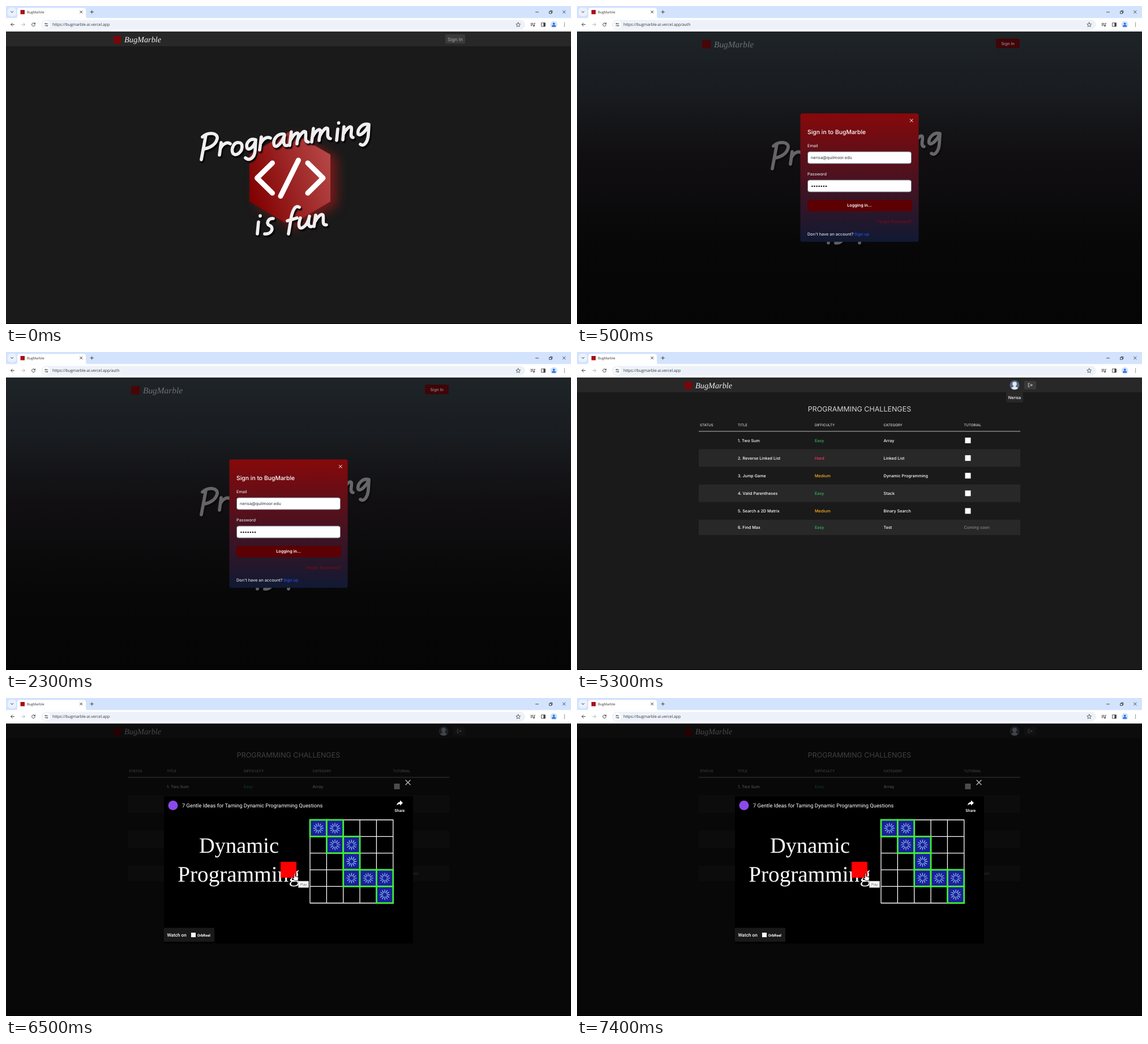
Animation of 998 by 561 pixels, one loop 8000 ms. Source, as an HTML page:

```html
<!DOCTYPE html>
<html lang="en">
<head>
<meta charset="utf-8">
<title>BugMarble</title>
<style>
  html, body { margin: 0; width: 100%; height: 100%; overflow: hidden; background: #1a1a1a; }
  svg { display: block; width: 998px; height: 561px; text-rendering: geometricPrecision; }
  text { white-space: pre; }
  .line { fill: none; stroke-linecap: round; stroke-linejoin: round; }
  .hexagon { filter: drop-shadow(12px 6px 9px rgba(200, 25, 25, .5)); }
  .lettering { filter: drop-shadow(2.5px 3px 1px #000); }
</style>
</head>
<body>
<svg id="stage" viewBox="0 0 998 561">
  <defs>
    <linearGradient id="hexFill" x1="0" y1=".7" x2="1" y2=".3">
      <stop stop-color="#800000"/><stop offset="1" stop-color="#b64646"/>
    </linearGradient>
    <linearGradient id="night" x2="0" y2="1">
      <stop stop-color="#1e2427"/><stop offset=".2" stop-color="#191c20"/>
      <stop offset=".42" stop-color="#110f12"/><stop offset=".75" stop-color="#070707"/>
      <stop offset="1" stop-color="#050505"/>
    </linearGradient>
    <linearGradient id="card" x2="0" y2="1">
      <stop stop-color="#86090b"/><stop offset="1" stop-color="#101a33"/>
    </linearGradient>
  </defs>
</svg>
<script>
const BRAND = 'BugMarble', LOOP = 8000;
const INTER = 'Inter, sans-serif', UI = 'Open Sans, sans-serif',
      ROBOTO = 'Roboto, sans-serif', SERIF = 'Liberation Serif, serif';

const rect = (x, y, w, h, fill, r = 0, more = '') =>
  `<rect x="${x}" y="${y}" width="${w}" height="${h}" rx="${r}" fill="${fill}" ${more}/>`;
const circle = (x, y, r, fill) => `<circle cx="${x}" cy="${y}" r="${r}" fill="${fill}"/>`;
const line = (d, color, w = 1) => `<path class="line" d="${d}" stroke="${color}" stroke-width="${w}"/>`;
const shape = (d, fill) => `<path d="${d}" fill="${fill}"/>`;
const text = (x, y, str, size, fill, { font = INTER, weight = 400, anchor = 'start', more = '' } = {}) =>
  `<text x="${x}" y="${y}" font-family="${font}" font-size="${size}" font-weight="${weight}"
    text-anchor="${anchor}" fill="${fill}" ${more}>${str}</text>`;
const group = (id, body) => `<g id="${id}">${body}</g>`;
const cross = (x, y, r, color, w) =>
  line(`M${x - r} ${y - r}l${2 * r} ${2 * r}m0 ${-2 * r}l${-2 * r} ${2 * r}`, color, w);
const page = (fill, more) => rect(0, 45, 998, 516, fill, 0, more);
const medium = { weight: 500 };

function browser() {
  const ink = '#3c4043';
  return rect(0, 0, 998, 45, '#fff') + rect(0, 0, 998, 21.3, '#d3e3fd')
    + rect(3, 3, 15, 15, '#eaf1fe', 5) + line('M8.7 9.6l1.9 1.9l1.9-1.9', '#1f1f1f', 1)
    + shape('M16 21.4q4 0 4-4v-10q0-4 4-4h113q4 0 4 4v10q0 4 4 4z', '#fff')
    + rect(25.5, 7, 7.5, 7.5, '#a8101a')
    + text(37, 13, BRAND, 6, '#333', { font: UI })
    + cross(132.7, 10.5, 1.9, '#222', 1)
    + line('M149 10.5h5.4m-2.7-2.7v5.4', '#333', .9)
    + line('M935.5 10.8h5', '#222', .8)
    + line('M960 9.7h3.6v3.6h-3.6zM961.2 9.5v-1.2h3.6v3.7h-1', '#222', .8)
    + cross(985.8, 10.5, 2.3, '#222', .8)
    + line('M14.5 32.7h-5.8m2.6-2.7l-2.7 2.7l2.7 2.7', ink, 1)
    + line('M27.5 32.7h5.8m-2.6-2.7l2.7 2.7l-2.7 2.7', '#b4b7bb', 1)
    + line('M51 31.2a2.9 2.9 0 1 0 .4 2.2M51.4 29.7v2h-2', ink, 1)
    + rect(62, 24.5, 855, 17, '#edf2fa', 8.5) + circle(71.3, 33, 6.7, '#fff')
    + line('M68.5 31.2h.6m2.6 0h2.3M68.5 34.8h2.3m2.7 0h.5', ink, .9)
    + line('M71.3 31.2a1 1 0 1 0-2 0a1 1 0 1 0 2 0M73.5 34.8a1 1 0 1 0-2 0a1 1 0 1 0 2 0', ink, .8)
    + line('M904.7 29l1.1 2.6l2.8.3l-2.1 1.9l.6 2.7l-2.4-1.5l-2.4 1.5l.6-2.7l-2.1-1.9l2.8-.3z', ink, .8)
    + line('M927 30.6h4.4m-4.4 2h4.4m-4.4 2h2.5M933.3 35v-4.6h1.3', ink, .9) + circle(932.3, 35, 1.2, ink)
    + line('M946 29.8h6.4v6.2h-6.4z', ink, .9) + rect(949.4, 29.8, 3, 6.2, ink)
    + circle(967.7, 32.8, 6, '#cfe1ff') + circle(967.7, 31.2, 1.8, '#1a67d8')
    + shape('M963.9 36.6q0-3 3.8-3t3.8 3z', '#1a67d8')
    + [30, 32.8, 35.6].map(y => circle(986.5, y, .75, ink)).join('');
}

const wordmark = (x, y, size, color) =>
  text(x, y, BRAND, size, color, { font: SERIF, more: 'font-style="italic"' });

const topBar = () => rect(0, 45, 998, 26, '#282828')
  + rect(190, 53, 13, 13, '#7d0509') + wordmark(209, 64, 14.3, '#f2f2f2');

function hero() {
  const m = 'm0 0l-3 24m2-10c5-10 11-14 13-11c2 5-2 11-2 18m1-7c5-10 11-17 14-14c2 6-3 17 5 18';
  const strokes = [
    'M353 228L345 271M347 231C358 221 375 224 373 234C371 244 361 250 351 252',
    'M380 241L377 263M379 251C383 243 391 239 396 243',
    'M411 241C402 240 397 253 401 260C406 266 417 258 417 248C417 243 414 241 411 241',
    'M441 236C430 232 423 243 426 251C430 256 439 247 441 237L440 255C439 268 430 274 423 268',
    'M451 231L448 254M450 242C454 234 461 230 467 233',
    'M491 226C480 224 470 236 474 246C478 252 488 240 492 228C490 238 489 248 497 246',
    'M504 222' + m, 'M543 216' + m,
    'M586 217L584 237M587.6 206v.5',
    'M597 213L595 236M596 226C601 217 607 211 610 214C612 219 606 231 613 232',
    'M641 209C630 206 620 217 622 226C626 231 636 220 641 210L640 227C639 240 632 249 626 244',
    'M446 381L444 402M449 370v.5',
    'M472 375C463 374 459 384 465 387C474 390 470 403 457 402',
    'M518 355C511 350 505 362 503 378L499 402M497 379L514 374',
    'M520 374C515 388 518 394 524 391C530 388 534 380 536 371C533 383 534 391 540 389',
    'M547 369L544 389M546 380C551 371 558 365 560 369C562 376 557 387 566 386'
  ];
  return `<g class="hexagon">${shape('M501.5 221L573 262V345L501.5 387L430 345V262z', 'url(#hexFill)')}</g>`
    + line('M470.5 277L443.5 303.5L470.5 330M516.5 272L485 335.5M533 277L560 303.5L533 330', '#fff', 9)
    + `<g class="lettering" role="img" aria-label="Programming is fun">${line(strokes.join(''), '#f0eeee', 5.7)}</g>`;
}

const landing = () => page('#1a1a1a') + topBar() + hero()
  + rect(776, 50, 35, 16.5, '#3a3a3a', 2)
  + text(793.5, 61.6, 'Sign In', 8.4, '#a9a9a9', { anchor: 'middle' });

function login() {
  const field = y => rect(407.5, y, 183, 21, '#fff', 3.5, 'stroke="#6b7280"');
  const pale = '#d9dbe0', size = 7.28;
  const dots = Array.from({ length: 7 }, (_, i) => circle(415.4 + i * 4.1, 318, 1.3, '#111')).join('');
  return page('url(#night)')
    + `<g transform="translate(0 16)" opacity=".38">${hero()}</g>`
    + rect(221, 60, 15, 15, '#480508') + wordmark(242, 72.5, 15.4, '#707272')
    + rect(740, 57.5, 42, 17, '#3f0508', 3)
    + text(761, 68.6, 'Sign In', size, '#948d8e', { weight: 500, anchor: 'middle' })
    + rect(394.5, 189.6, 209, 226.4, 'url(#card)', 4)
    + cross(590.8, 202, 2.5, '#fff', 1)
    + text(407, 225.5, 'Sign in to ' + BRAND, 10.4, '#fff', medium)
    + text(407, 249.2, 'Email', size, pale, medium) + field(257)
    + text(413, 270.3, 'nerisa@quilmoor.edu', size, '#30343b')
    + text(407, 299.2, 'Password', size, pale, medium) + field(307) + dots
    + rect(407, 342, 185, 20, '#5c0003', 3)
    + text(499, 354.3, 'Logging in...', size, '#fff', { weight: 600, anchor: 'middle' })
    + text(591.5, 382.6, 'Forgot Password?', size, '#8b0a12', { anchor: 'end' })
    + text(407, 405.3, "Don't have an account?", size, pale, medium)
    + text(490, 405.3, 'Sign up', size, '#2152ea', medium);
}

function challenges() {
  const columns = [217, 284, 420, 541.5, 683.5];
  const levels = { Easy: '#2cbb5d', Medium: '#ffb11e', Hard: '#ff375f' };
  const rows = [
    ['Two Sum', 'Easy', 'Array'], ['Reverse Linked List', 'Hard', 'Linked List'],
    ['Jump Game', 'Medium', 'Dynamic Programming'], ['Valid Parentheses', 'Easy', 'Stack'],
    ['Search a 2D Matrix', 'Medium', 'Binary Search'], ['Find Max', 'Easy', 'Test']
  ];
  const cell = (col, y, str, color) => text(columns[col], y + 2.5, str, 7.22, color, medium);
  const body = rows.map(([title, level, category], i) => {
    const last = i === 5, y = last ? 309.6 : 156 + i * 31.1;
    return (i % 2 ? rect(215, 171.5 + (i - 1) * 31.1, 568, last ? 27 : 31, '#282828') : '')
      + cell(1, y, `${i + 1}. ${title}`, '#fff') + cell(2, y, level, levels[level])
      + cell(3, y, category, '#fff')
      + (last ? text(683.5, y + 2.5, 'Coming soon', 7.28, '#8f949c') : rect(685.5, y - 5, 10, 10, '#fff'));
  }).join('');
  return page('#1a1a1a') + topBar()
    + circle(773, 58.4, 8.5, '#52688a') + circle(773, 56.2, 3.8, '#e6e6e6')
    + shape('M771 58h4v3.2q3 .6 4 2.6a8.4 8.4 0 0 1-12 0q1-2 4-2.6z', '#e6e6e6')
    + rect(790, 51, 21, 15, '#3a3a3a', 2)
    + line('M799.3 55.2h-2v6.4h2M799.7 58.4h4.2m-1.7-1.9l1.9 1.9l-1.9 1.9', '#ddd', .9)
    + text(499, 104.5, 'PROGRAMMING CHALLENGES', 12.48, '#d4d6d9', { anchor: 'middle' })
    + ['STATUS', 'TITLE', 'DIFFICULTY', 'CATEGORY', 'TUTORIAL']
        .map((name, i) => text(columns[i], 131.3, name, 6.15, '#d4d6d9', medium)).join('')
    + rect(215, 139.5, 568, .9, '#c8cacd') + body;
}

const nameTip = () => rect(758, 70.5, 30, 18.5, '#282828', 2)
  + text(773, 82.6, 'Nerisa', 7.28, '#fff', { weight: 500, anchor: 'middle' });

function video() {
  const X = 537, Y = 215, STEP = 29.35;
  const path = ['00', '01', '11', '12', '22', '32', '33', '34', '44'];
  const rays = Array.from({ length: 12 }, (_, i) => {
    const c = Math.cos(i * Math.PI / 6), s = Math.sin(i * Math.PI / 6);
    return `M${4 * c} ${4 * s}L${8.6 * c} ${8.6 * s}`;
  }).join('');
  const grid = Array.from({ length: 6 }, (_, i) =>
    `M${X} ${Y + i * STEP}h${5 * STEP}M${X + i * STEP} ${Y}v${5 * STEP}`).join('');
  const cells = path.map(([row, col]) => {
    const x = X + col * STEP, y = Y + row * STEP;
    return rect(x, y, STEP, STEP, '#1d1f9c', 0, 'stroke="#3ff02f" stroke-width="2.8"')
      + `<g transform="translate(${x + STEP / 2} ${y + STEP / 2})">${line(rays, '#8fd0ee', 1.2)}</g>`;
  }).join('');
  const hand = 'M508.6 309.5q1.5-1 2 .6v4.4l4.6 1.2q1.4.5 1.2 2l-.8 4.8h-5.4l-4.2-4.6q.8-1.3 2.6-.2z';
  return page('#000', 'opacity=".7"')
    + cross(710, 149, 4, '#b4b4b4', 1.5)
    + rect(279, 173.3, 440, 259.7, '#000')
    + circle(295, 189.5, 8.5, '#8b4ae8')
    + text(311, 192.6, '7 Gentle Ideas for Taming Dynamic Programming Questions', 9.36, '#fff', { font: ROBOTO })
    + shape('M696 180.5l5 4.6l-5 4.6v-2.8q-4 0-6 2.8q.6-5.6 6-6.5z', '#fff')
    + text(695.3, 201.2, 'Share', 7, '#fff', { font: ROBOTO, weight: 500, anchor: 'middle' })
    + text(411.5, 272.6, 'Dynamic', 38.5, '#fff', { font: SERIF, anchor: 'middle' })
    + text(411, 323.5, 'Programming', 39.2, '#fff', { font: SERIF, anchor: 'middle' })
    + line(grid, '#fff', 1.3) + cells
    + rect(485, 289, 28, 28, '#f00')
    + rect(279, 405.5, 89, 24.5, '#191919')
    + text(284.5, 420.8, 'Watch on', 8.2, '#fff', { font: ROBOTO, weight: 500 })
    + rect(327, 414, 8, 8, '#fff')
    + text(338, 420.8, 'OrbReel', 6.4, '#fff', { font: ROBOTO, weight: 700 })
    + `<path d="${hand}" fill="#fff" stroke="#000" stroke-width=".8"/>`
    + rect(516.3, 323, 18.5, 11.5, '#fff', 0, 'stroke="#777" stroke-width=".6"')
    + text(525.5, 331, 'Play', 6, '#555', { font: UI, anchor: 'middle' });
}

const stage = document.getElementById('stage');
stage.innerHTML += browser()
  + text(82, 35.3, '', 6.9, '#333', { font: UI, more: 'id="url"' })
  + group('landing', landing()) + group('login', login()) + group('challenges', challenges())
  + group('nameTip', nameTip()) + group('video', video())
  + rect(0, 560, 998, 1, '#000');

const scenes = [
  { until: 500, show: ['landing'], path: '' },
  { until: 3500, show: ['login'], path: '/auth' },
  { until: 6500, show: ['challenges', 'nameTip'], path: '' },
  { until: LOOP, show: ['challenges', 'video'], path: '' }
];
const layers = ['landing', 'login', 'challenges', 'nameTip', 'video'].map(id => document.getElementById(id));
const url = document.getElementById('url');
const start = performance.now();
let current;

function draw() {
  const time = (performance.now() - start) % LOOP;
  const scene = scenes.find(s => time < s.until);
  if (scene !== current) {
    current = scene;
    for (const layer of layers) layer.style.display = scene.show.includes(layer.id) ? '' : 'none';
    url.textContent = 'https://bugmarble-ai.vercel.app' + scene.path;
  }
  requestAnimationFrame(draw);
}
draw();
</script>
</body>
</html>
```
